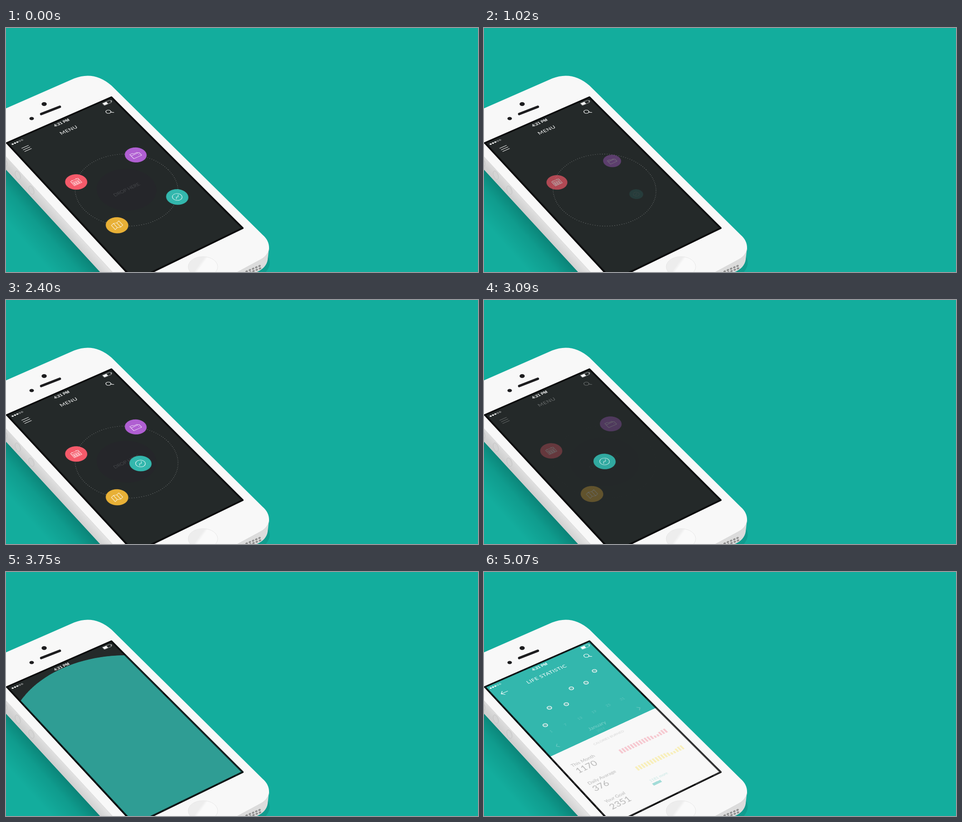
An HTML page that plays this animation: 1039x539 px, repeating every 5.1 s.

```html
<!DOCTYPE html>
<html lang="en">
<head>
<meta charset="utf-8">
<title>Phone menu</title>
<style>
html, body { margin: 0; width: 100%; height: 100%; overflow: hidden; background: #13ad9d; }
#stage { position: relative; width: 100%; height: 100%; overflow: hidden; contain: strict; }
svg { position: absolute; left: 0; top: 0; }
/* maps the flat 320 x 568 screen onto the tilted phone */
#screen {
  transform-origin: 0 0; overflow: hidden;
  transform: matrix3d(.7375,-.3033,0,.0000806, .4623,.4713,0,-.0001144, 0,0,1,0, 2,254,0,1);
  font-family: Lato, sans-serif;
}
.line { fill: none; stroke: #fff; stroke-linecap: round; stroke-linejoin: round; }
.mid { text-anchor: middle; }
.title { font-size: 16px; fill: #fff; letter-spacing: .8px; }
</style>
</head>
<body>
<div id="stage">
<svg width="100%" height="100%">
  <defs>
    <linearGradient id="shade" gradientUnits="userSpaceOnUse" x1="105" y1="425" x2="45" y2="478">
      <stop offset="0" stop-color="#05685f" stop-opacity=".6"/>
      <stop offset=".4" stop-color="#05685f" stop-opacity=".25"/>
      <stop offset="1" stop-color="#05685f" stop-opacity="0"/>
    </linearGradient>
    <linearGradient id="side" gradientUnits="userSpaceOnUse" x1="120" y1="412" x2="105" y2="425">
      <stop offset="0" stop-color="#e2e2e2"/><stop offset="1" stop-color="#cfcfcf"/>
    </linearGradient>
    <linearGradient id="home" x1="0" y1="0" x2="1" y2=".5">
      <stop offset=".45" stop-color="#ededed"/><stop offset=".55" stop-color="#fafafa"/>
    </linearGradient>
  </defs>
  <path fill="url(#shade)" d="M0 311L210 539H70L0 470z"/>
  <path fill="#0e9284" opacity=".6" d="M577 505Q586 522 572 539H540z"/>
  <path fill="url(#side)" d="M0 280V313L207 539H240z"/>
  <path fill="#dcdcdc" d="M579 485L576 512Q573 530 552 539H490z"/>
  <path fill="#f8f8f8" d="M-2 178.500L150 111.500Q194 94 232 127L565 457Q580 470 579 488Q577 504 556 514L506 541H236L-2 282z"/>
  <path fill="none" stroke="#d2d2d2" stroke-width=".8" d="M579 488Q577 504 556 514L506 541M236 541L-2 282"/>
  <g fill="#d4d4d4" stroke="#c0c0c0" stroke-width=".8">
    <ellipse cx="-3" cy="297" rx="5" ry="9" transform="rotate(-22 -3 297)"/>
    <ellipse cx="26" cy="325" rx="5" ry="10" transform="rotate(-22 26 325)"/>
    <ellipse cx="56" cy="358" rx="5" ry="10" transform="rotate(-22 56 358)"/>
  </g>
  <g fill="none" stroke="#8f8f8f" stroke-width="4" stroke-linecap="round" stroke-dasharray="1.5 6.2">
    <path d="M529 538L562 524M537 540L562 530"/>
  </g>
  <ellipse cx="84" cy="168" rx="5.7" ry="4.2" fill="#1d1d1f"/>
  <ellipse cx="56.500" cy="200" rx="5" ry="3.500" fill="#1d1d1f"/>
  <path d="M77.500 190L118.500 174" stroke="#1d1d1f" stroke-width="5.500" stroke-linecap="round"/>
  <ellipse cx="433.500" cy="527.500" rx="32.500" ry="22.500" fill="url(#home)" stroke="#e2e2e2" stroke-width=".8"/>
  <path d="M2 254L232 153L521 442L283 558z" stroke="#0a0a0b" stroke-width="4" stroke-linejoin="round"/>
</svg>

<svg id="screen" width="320" height="568">
  <rect width="320" height="568" fill="#242929"/>
  <circle id="ring" class="line" cx="159" cy="303.500" r="127.500" stroke-width="1.5" stroke-dasharray="0 6" opacity=".6"/>
  <g id="zone">
    <circle r="74" fill="#25262a"/>
    <text class="mid" y="5" font-size="14" font-weight="300" fill="#5b5d60">DROP HERE</text>
  </g>
  <g id="menu">
    <text class="mid title" x="158" y="50.500">MENU</text>
    <path class="line" stroke-width="1.6" d="M21 37h20M21 44h20M21 51h20"/>
    <g class="search"></g>
  </g>
  <g id="buttons"></g>
  <g id="stats">
    <g id="statHead">
      <text class="mid title" x="158" y="50.500">LIFE STATISTIC</text>
      <path class="line" stroke-width="1.7" d="M40 44H21M28 37L21 44L28 51"/>
      <g class="search"></g>
    </g>
    <g id="points"></g>
    <g id="calendar" fill="#fff"></g>
    <g id="panel">
      <rect y="298" width="320" height="290" fill="#f8f8f8"/>
      <g id="figures" fill="#838383"></g>
      <g id="bars"></g>
    </g>
  </g>
  <g fill="#fff">
    <text class="mid" x="158" y="16.500" font-family="Liberation Sans, sans-serif" font-size="12" font-weight="bold">4:21 PM</text>
    <g id="signal"></g>
    <rect class="line" x="287" y="7" width="23" height="9.500" rx="1.500" stroke-width=".9"/>
    <rect x="288" y="8" width="11" height="7.500"/><rect x="311" y="10" width="1.700" height="4"/>
  </g>
  <rect width="320" height="568" fill="none" stroke="#0a0a0b" stroke-width="5"/>
</svg>
</div>

<script>
const LOOP = 5100, CX = 159, CY = 303.5, REACH = 90;
const el = id => document.getElementById(id);
const ramp = (t, from, to) => Math.min(1, Math.max(0, (t - from) / (to - from)));
const easeOut = p => 1 - (1 - p) ** 2;
const easeInOut = p => p < .5 ? 4 * p ** 3 : 1 - 4 * (1 - p) ** 3;
const fade = (node, value) => node.setAttribute('opacity', value);
const place = (node, x, y, s = 1) => node.setAttribute('transform', `translate(${x} ${y}) scale(${s})`);
const repeat = (n, make) => Array.from({ length: n }, (_, i) => make(i)).join('');

const dayCells = repeat(6, i => `M${-8 + i % 3 * 6} ${i < 3 ? -1 : 4}h3v3h-3z`);
const buttons = [
  { x: -1, y: -1, start: 720, color: '#f55a6a', icon: 'M-11-9h22v18h-22zM-11-4h22M-6-11v3M6-11v3' + dayCells },
  { x: 1, y: -1, start: 840, color: '#b05fd2', icon: 'M-12-3V-9H-4L-2-6H8V-3M-12-3H12V9H-12zM7 3h1' },
  { x: -1, y: 1, start: 1170, color: '#e8b036', icon: 'M-12-7L-4-10L4-7L12-10V7L4 10L-4 7L-12 10zM-4-10V7M4-7V10' },
  { x: 1, y: 1, start: 960, color: '#33b7ad', icon: 'M-12 0a12 12 0 1 0 24 0a12 12 0 1 0-24 0zM-6 5L-2-1L2 1L6-5' }
];
el('buttons').innerHTML = buttons.map(b => `<g><circle r="27.500" fill="${b.color}"/>
  <path class="line" stroke-width="1.2" d="${b.icon}"/></g>`).join('');
buttons.forEach((b, i) => b.node = el('buttons').children[i]);
const chosen = buttons[3];
const [disc, discIcon] = chosen.node.children;

document.querySelectorAll('.search').forEach(g => g.innerHTML =
  '<circle class="line" cx="282" cy="42" r="6.500" stroke-width="1.600"/><path class="line" stroke-width="1.800" d="M287 47l5 5"/>');
el('signal').innerHTML = repeat(5, i =>
  `<circle cx="${10 + 7 * i}" cy="11.500" r="2.300" stroke="#fff" stroke-width=".8" ${i > 2 ? 'fill="none"' : ''}/>`);

const column = i => 52 + 43 * i;
el('points').innerHTML = [199, 152.5, 164.5, 123, 126, 101].map((y, i) =>
  `<circle cx="${column(i)}" cy="${y}" r="6" fill="#65bdb5" stroke="#fff" stroke-width="1.8"/>`).join('');
el('calendar').innerHTML = repeat(6, i =>
  `<text class="mid" x="${column(i)}" y="229" font-size="11" opacity=".6">${1 + 6 * i}</text>`) +
  `<text class="mid" x="159" y="276" font-size="15">January</text>
   <text class="mid" x="159" y="290" font-size="10" opacity=".4">2014</text>
   <path class="line" stroke-width="1.300" d="M40 270L34 276L40 282M280 270L286 276L280 282"/>`;

const figures = [['This Month', 1170], ['Daily Avarage', 376], ['Your Goal', 2351]];
el('figures').innerHTML = figures.map(([label, value], i) =>
  `<text x="27" y="${358 + 72 * i}" font-size="13.500">${label}</text>
   <text x="27" y="${384 + 72 * i}" font-size="25">${value}</text>`).join('');
const barRow = (base, color) => repeat(17, i => {
  const h = 15 - 8 * Math.exp(-((i - 12.5) ** 2) / 2);
  return `<rect x="${154.5 + 8.4 * i}" y="${base - h}" width="5" height="${h}" fill="${color}"/>`;
});
el('bars').innerHTML = barRow(385, '#f58a9c') + barRow(455, '#f8e468') +
  `<rect x="157" y="509" width="24" height="8" fill="#33b7ad"/>
   <g fill="#a8a8a8"><text class="mid" x="159" y="325" font-size="10">CALORIES BURNED</text>
   <text x="157" y="503" font-size="11" fill="#7fd0c8">1181 more</text></g>`;

function draw(time) {
  const t = time < 90 ? 2000 : time;   // the loop opens on the finished menu
  const leave = ramp(t, 2820, 3330);
  const stay = Math.max(0, 1 - 1.3 * leave);
  const intro = ramp(t, 90, 510);

  fade(el('menu'), intro * stay);
  fade(el('ring'), .6 * intro * Math.max(0, 1 - 1.8 * leave));
  const zoneIn = ramp(t, 1440, 1740);
  fade(el('zone'), zoneIn * Math.max(0, 1 - 1.6 * leave));
  place(el('zone'), CX, CY, .8 + .2 * easeOut(zoneIn) + .3 * leave);

  const drag = easeInOut(ramp(t, 2100, 2610));
  for (const b of buttons) {
    const p = ramp(t, b.start, b.start + 450), s = .5 + .5 * easeOut(p);
    const isChosen = b === chosen;
    const reach = REACH * s * (isChosen ? 1 - drag : 1);
    place(b.node, CX + b.x * reach, CY + b.y * reach - (isChosen ? 0 : 25 * leave), s);
    fade(b.node, p * (isChosen ? 1 : stay));
  }

  const spread = ramp(t, 3360, 3870);
  disc.setAttribute('r', 27.5 + 357 * spread);
  disc.setAttribute('cy', 20 * spread);
  fade(disc, 1 - .18 * leave + .18 * ramp(t, 3900, 4300));
  fade(discIcon, (1 - .2 * leave) * (1 - ramp(t, 3360, 3510)));

  fade(el('stats'), t < 3900 ? 0 : 1);
  place(el('panel'), 0, 275 * (1 - ramp(t, 3900, 4410)) ** 3);
  fade(el('statHead'), ramp(t, 4000, 4400));
  [...el('points').children].forEach((dot, i) => {
    const p = ramp(t, 4440 + 70 * i, 4590 + 70 * i);
    fade(dot, p);
    dot.setAttribute('r', 5.7 * easeOut(p));
  });
  fade(el('calendar'), ramp(t, 4900, 5400));
  fade(el('figures'), ramp(t, 4800, 5300));
  fade(el('bars'), ramp(t, 4900, 5300));
}

const began = performance.now();
(function tick() {
  draw((performance.now() - began) % LOOP);
  requestAnimationFrame(tick);
})();
</script>
</body>
</html>
```
